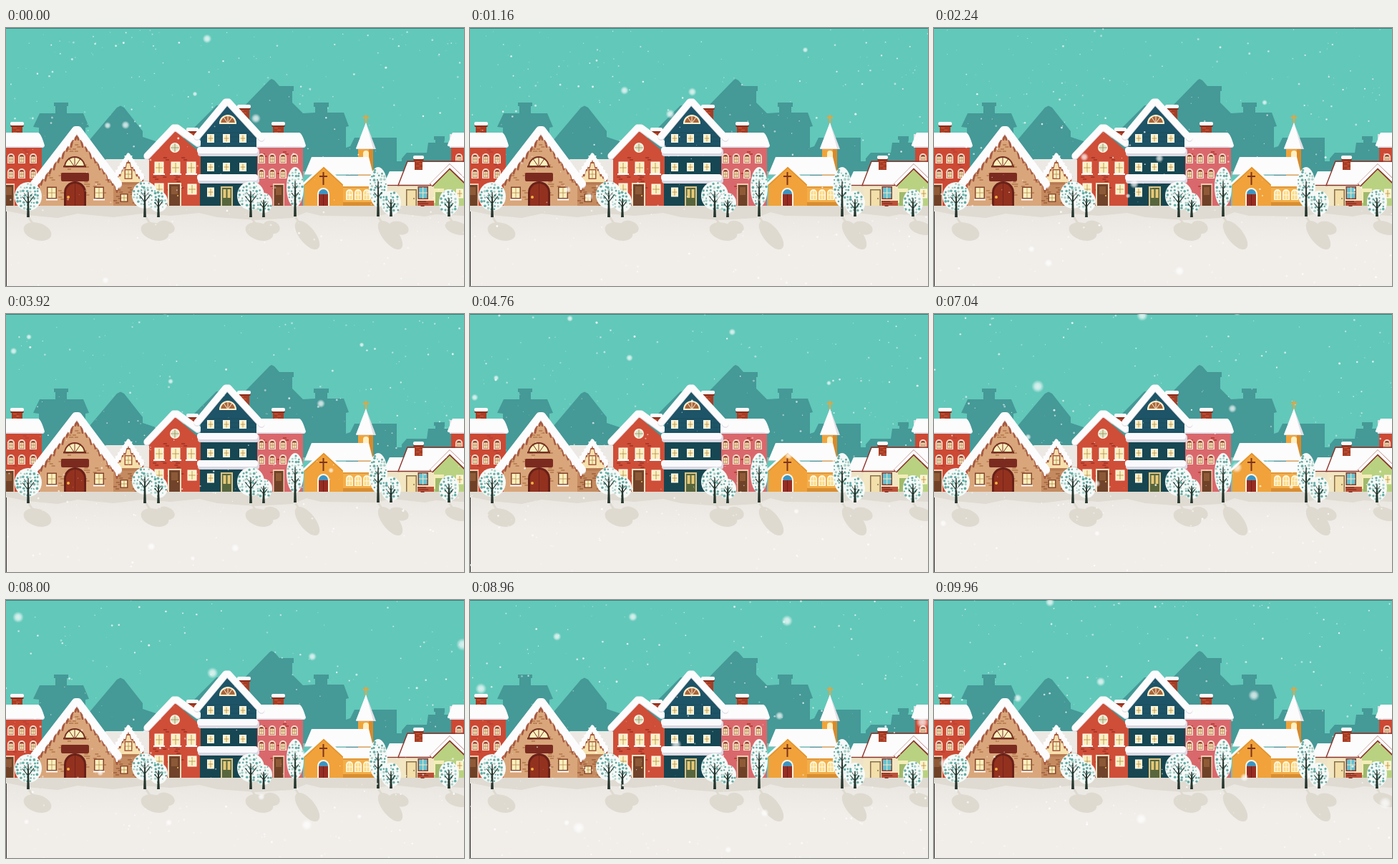
Animation of 640x360 px, one loop 10 s. Source, as an HTML page with a canvas:

```html
<!DOCTYPE html>
<html lang="en">
<head>
<meta charset="utf-8">
<title>Snowy village</title>
<style>
html, body { margin: 0; width: 100%; height: 100%; overflow: hidden; background: #62c8ba; }
canvas { display: block; width: 640px; height: 360px; }
</style>
</head>
<body>
<canvas id="stage" width="640" height="360"></canvas>
<script>
const W = 640, H = 360, LOOP = 10000, STEP = 40;
const view = document.getElementById('stage').getContext('2d');
const scene = document.createElement('canvas');
scene.width = W;
scene.height = H;
const g = scene.getContext('2d');

const SNOW = '#fdfcfd', SHADE = '#e3dfe6', CREAM = '#fdf0bd', BRICK = '#a83d25', BROWN = '#7b3b25';

function seeded(seed) {
  return () => (seed = (seed * 16807) % 2147483647) / 2147483647;
}

// drawing helpers
function rect(color, x, y, w, h) {
  g.fillStyle = color;
  g.fillRect(x, y, w, h);
}
function trace(pts) {
  g.beginPath();
  for (let i = 0; i < pts.length; i += 2) g.lineTo(pts[i], pts[i + 1]);
}
function poly(color, ...pts) {
  trace(pts);
  g.fillStyle = color;
  g.fill();
}
function line(color, width, ...pts) {
  trace(pts);
  g.strokeStyle = color;
  g.lineWidth = width;
  g.stroke();
}
function oval(color, x, y, rx, ry = rx, turn = 0) {
  g.beginPath();
  g.ellipse(x, y, rx, ry, turn, 0, 7);
  g.fillStyle = color;
  g.fill();
}
function arch(color, x, y, w, h) {
  const r = w / 2;
  g.beginPath();
  g.arc(x + r, y + r, r, Math.PI, 0);
  g.lineTo(x + w, y + h);
  g.lineTo(x, y + h);
  g.fillStyle = color;
  g.fill();
}
function slab(color, x, y, w, h, r) {
  g.beginPath();
  g.roundRect(x, y, w, h, r);
  g.fillStyle = color;
  g.fill();
}

// building parts
function pane(x, y, w, h, frame = '#fff8e8', bar = '#b08a4c') {
  rect(frame, x - w / 2 - 1.5, y - h / 2 - 1.5, w + 3, h + 3);
  rect(CREAM, x - w / 2, y - h / 2, w, h);
  line(bar, 0.8, x, y - h / 2, x, y + h / 2);
  line(bar, 0.8, x - w / 2, y, x + w / 2, y);
}
function archPane(x, y, frame = '#f8dccb') {
  arch(frame, x - 5, y - 8, 10, 14);
  arch('#8f3a2d', x - 3.2, y - 6, 6.4, 11);
  rect(CREAM, x - 2.6, y - 3.5, 5.2, 8);
  line('#a66a4b', 0.7, x, y - 4, x, y + 5);
  line('#a66a4b', 0.7, x - 3, y, x + 3, y);
}
function fanlight(x, y, r, frame, glass) {
  arch(frame, x - r, y - r, 2 * r, r);
  arch(glass, x - r + 2, y - r + 2, 2 * r - 4, r - 3);
  for (const a of [-0.6, 0, 0.6]) line(frame, 1, x, y, x + r * Math.sin(a), y - r * Math.cos(a));
}
function chimney(x, y, w, h) {
  rect(BRICK, x, y, w, h);
  rect('#8d2e1c', x - 1.5, y + 4, w + 3, 3);
  for (let j = 8; j < h; j += 3) rect('#c65b3c', x + (j % 2) * 4 + 2, y + j, 5, 1);
  slab(SNOW, x - 2, y, w + 4, 5, 2);
}
function bricks(color, seed, count, x, y, w, h) {
  const rnd = seeded(seed);
  for (let i = 0; i < count; i++) {
    const bx = x + rnd() * w, by = y + Math.floor(rnd() * h / 3) * 3;
    rect(color, bx, by, 5, 2);
    rect(color, bx + 3, by + 3, 5, 2);
  }
}
function snowRoof(width, ...pts) {
  g.lineCap = g.lineJoin = 'round';
  line(SHADE, width, ...pts.map((p, i) => i % 2 ? p + 1.5 : p));
  line(SNOW, width, ...pts);
  g.lineCap = 'butt';
  g.lineJoin = 'miter';
}
function icing(x1, y1, x2, y2, n, color) {
  for (let i = 0; i <= n; i++) {
    const x = x1 + (x2 - x1) * i / n, y = y1 + (y2 - y1) * i / n;
    poly(color, x - 3.6, y - 4, x + 3.6, y - 4, x + 1, y + 5 + i % 2 * 2, x - 1, y + 5 + i % 2 * 2);
  }
}

function backdrop() {
  rect('#62c8ba', 0, 0, W, H);
  const c = '#459997';
  poly(c, 47, 119, 69, 119, 69, 109, 67, 109, 67, 104, 87, 104, 87, 109, 85, 109, 85, 119, 108, 119,
    116, 138, 111, 139, 111, 215, 46, 215, 46, 139, 38, 138);
  poly(c, 111, 163, 155, 111, 160, 108.5, 165, 111, 191, 144, 191, 152, 215, 160, 215, 215, 100, 215);
  poly(c, 240, 162, 294, 108, 310, 107, 330, 112, 368, 73, 371, 71, 375, 73, 382, 81, 402, 81, 402, 88,
    400, 88, 400, 104, 415, 119, 432, 118, 432, 110, 430, 110, 430, 104, 451, 104, 451, 110, 449, 110,
    449, 118, 472, 118, 479, 137, 475, 138, 475, 200, 240, 200);
  poly(c, 475, 167, 481, 165, 487, 153, 546, 153, 546, 186, 553, 186, 553, 182, 560, 174, 588, 174,
    590, 160, 600, 160, 600, 156, 598, 156, 598, 151, 613, 151, 613, 156, 612, 160, 640, 160, 640, 215, 475, 215);
}

function ground() {
  const fill = g.createLinearGradient(0, 248, 0, 300);
  fill.addColorStop(0, '#e9e5df');
  fill.addColorStop(1, '#f1eeea');
  rect(fill, 0, 248, W, 112);
  poly('#dfdbd2', 0, 248, 640, 248, 640, 262, 600, 260, 585, 263, 540, 258, 515, 263, 440, 262, 420, 257,
    400, 265, 350, 268, 295, 264, 270, 258, 230, 262, 190, 259, 150, 264, 100, 259, 72, 265, 30, 261, 0, 255);
  const s = '#dedad0';
  for (const x of [31, 195, 342, 404, 520, 619]) line(s, 3, x, 263, x + 12, 282);
  oval(s, 44, 284, 20, 12, 0.3);
  oval(s, 208, 284, 20, 12, 0.3);
  oval(s, 223, 278, 13, 9, 0.3);
  oval(s, 354, 284, 20, 12, 0.3);
  oval(s, 371, 278, 12, 9, 0.3);
  oval(s, 421, 289, 24, 11, 0.9);
  oval(s, 537, 289, 24, 11, 0.9);
  oval(s, 549, 279, 14, 9, 0.3);
  oval(s, 630, 279, 17, 9, 0.3);
}

function rowHouse(x, wall, cols, door) {
  rect(wall, x + 2, 160, 64, 88);
  bricks('#b84237', x + 99, 5, x + 4, 166, 50, 76);
  for (const c of cols) {
    archPane(c, 183);
    archPane(c, 204);
  }
  rect('#f0cdb4', door - 8, 217, 16, 31);
  rect('#6f4127', door - 6.5, 219, 13, 29);
  rect('#8f5a37', door - 4, 222, 8, 11);
  chimney(x + 24, 131, 15, 17);
  poly(SHADE, x, 148, x + 62, 148, x + 70, 165, x + 68, 167, x, 167);
  g.beginPath();
  g.moveTo(x + 4, 146);
  g.lineTo(x + 61, 146);
  g.quadraticCurveTo(x + 65, 147, x + 70, 164);
  g.quadraticCurveTo(x + 68, 167, x + 62, 165);
  g.lineTo(x + 2, 165);
  g.quadraticCurveTo(x - 4, 166, x - 3, 163);
  g.fillStyle = SNOW;
  g.fill();
}

function gingerbread() {
  slab('#ece9e4', 136, 183, 66, 40, 5);
  rect('#d9d6cf', 146, 213, 55, 35);
  // annex
  rect('#c58b60', 148, 215, 38, 33);
  bricks('#a86a45', 37, 7, 150, 222, 28, 22);
  poly('#f6e1ad', 171, 182, 189, 215, 152, 215);
  icing(170, 184, 152, 211, 5, '#a8593f');
  icing(172, 184, 190, 211, 5, '#a8593f');
  snowRoof(5, 151, 208, 171, 177, 191, 208);
  icing(169, 182, 153, 207, 5, SNOW);
  icing(173, 182, 189, 207, 5, SNOW);
  line('#b67a52', 3, 149, 217, 190, 217);
  pane(171, 204, 8, 11, '#a8593f');
  pane(165, 237, 8, 9, '#8b4a30');
  // main gable
  poly('#d9a67b', 99, 146, 150, 218, 150, 248, 47, 248, 47, 218);
  bricks('#bd8257', 71, 20, 54, 184, 85, 60);
  bricks('#bd8257', 12, 4, 85, 162, 20, 14);
  icing(97, 152, 43, 223, 9, '#a75940');
  icing(101, 152, 155, 223, 9, '#a75940');
  snowRoof(10, 39, 217, 97, 142, 101, 142, 157, 217);
  icing(94, 151, 41, 219, 9, SNOW);
  icing(104, 151, 155, 219, 9, SNOW);
  fanlight(96, 194, 15, '#743022', CREAM);
  rect('#743022', 80, 192, 32, 2.5);
  slab('#7b2a20', 77, 202, 39, 12, 2);
  arch('#682018', 81, 214, 31, 34);
  arch('#93311f', 84, 217, 25, 31);
  line('#752319', 1, 96.5, 217, 96.5, 248);
  oval('#f3b343', 87, 236, 2);
  for (const x of [64, 130]) {
    pane(x, 230, 11, 14, '#83452d');
    rect(SNOW, x - 8, 238.5, 16, 2);
  }
}

function redHouse() {
  poly('#cf4e38', 236, 143, 272, 175, 272, 248, 200, 248, 200, 178);
  bricks('#a93827', 51, 12, 203, 180, 58, 62);
  chimney(254, 139, 13, 16);
  snowRoof(9, 197, 178, 234, 139, 239, 139, 268, 160);
  oval('#fff4e2', 236, 167, 7);
  oval('#d9e5c8', 236, 167, 5);
  line('#a98752', 0.8, 230, 167, 242, 167);
  line('#a98752', 0.8, 236, 161, 236, 173);
  for (const x of [214, 237, 259]) {
    pane(x, 195, 10, 14);
    rect(SNOW, x - 8, 203, 16, 2);
  }
  pane(214, 225, 10, 14);
  pane(260, 225, 10, 12);
  rect('#f5dfc2', 226, 216, 19, 32);
  rect('#70432a', 228, 218, 15, 30);
  rect('#8c5938', 231, 221, 9, 11);
  oval('#f3c04d', 240, 234, 1);
}

function blueHouse() {
  chimney(325, 107, 15, 26);
  poly('#1e5467', 309, 106, 350, 147, 350, 170, 272, 170, 272, 144);
  rect('#164752', 272, 172, 79, 36);
  rect('#174650', 271, 210, 81, 38);
  for (let y = 146; y < 245; y += 6) line('#184955', 0.6, 273, y, 350, y);
  snowRoof(9, 267, 151, 307, 103, 311, 103, 357, 153);
  for (const y of [166, 204]) {
    slab('#d9d8e2', 268, y + 2, 86, 11, 4);
    slab('#faf9fc', 267, y, 85, 9, 4);
  }
  fanlight(310, 133, 12, '#fff1cf', '#a9653c');
  rect('#fff1cf', 298, 132, 24, 2);
  for (const x of [286, 308, 331]) {
    pane(x, 154, 7, 9);
    pane(x, 194, 7, 9);
  }
  pane(286, 229, 7, 10);
  pane(333, 229, 7, 10);
  rect('#d9c38a', 300, 221, 17, 27);
  rect('#58663d', 302, 223, 13, 25);
  rect('#e7c978', 303.5, 225, 4, 12);
  rect('#e7c978', 309.5, 225, 4, 12);
}

function church() {
  rect('#f0a43a', 492, 166, 21, 45);
  rect('#d98a2a', 507, 168, 6, 36);
  arch('#fff0c4', 499, 171, 8, 10);
  line('#f2a132', 2, 503, 121, 503, 135);
  line('#f2a132', 2, 499, 125, 507, 125);
  poly(SHADE, 503, 132, 517, 169, 489, 169);
  poly(SNOW, 503, 132, 513, 168, 489, 168);
  poly(SNOW, 427, 180, 507, 180, 513, 204, 417, 204);
  line('#c8c9d2', 1, 417, 204.5, 513, 204.5);
  rect('#f3ae49', 466, 218, 48, 30);
  poly(SNOW, 450, 206, 512, 206, 516, 221, 466, 221);
  line('#cd812b', 1.2, 466, 222, 515, 222);
  for (const x of [480, 492, 504]) {
    arch('#fff8e6', x - 5, 225, 10, 15);
    arch('#fbdc86', x - 3.5, 227, 7, 12);
    line('#fff8e6', 1, x, 226, x, 240);
    line('#fff8e6', 1, x - 4, 233, x + 4, 233);
  }
  rect('#d98d30', 470, 243, 44, 5);
  poly('#f1a23a', 444, 193, 471, 218, 471, 248, 417, 248, 417, 218);
  line(SNOW, 3, 415, 218, 444, 191.5, 473, 218);
  line('#d88a2c', 1, 418, 219, 444, 195, 470, 219);
  line('#7d351c', 2, 443.5, 201, 443.5, 219);
  line('#7d351c', 2, 438, 207, 449, 207);
  arch('#fff6e6', 435, 223, 17, 25);
  arch('#3e93c0', 437, 225, 13, 8);
  rect('#982c22', 437, 232, 13, 16);
  line('#6e1e18', 1, 443.5, 232, 443.5, 248);
}

function cottage() {
  rect('#eee3c6', 529, 216, 26, 32);
  poly(SNOW, 536, 200, 556, 200, 556, 219, 527, 219);
  line('#86352a', 1.3, 527, 219.5, 556, 219.5);
  rect('#f2e7c2', 550, 216, 50, 32);
  poly(SNOW, 561, 187, 640, 187, 640, 219, 549, 219);
  line('#8d3329', 1.4, 640, 186, 561, 186, 548, 219.5, 603, 219.5);
  chimney(571, 178, 11, 20);
  rect('#8a6e4b', 559, 225, 15, 23);
  rect('#f2dfa9', 560.5, 226.5, 12, 21.5);
  oval('#8a6e4b', 570, 238, 0.9);
  rect('#8d3a2c', 575.5, 221, 14.5, 18);
  rect('#65c3d1', 577, 222.5, 11.5, 15);
  line('#f3e8c7', 1, 582.7, 222, 582.7, 238);
  line('#f3e8c7', 1, 577, 230, 589, 230);
  rect('#bd5038', 575, 241, 25, 7);
  bricks('#963a29', 23, 4, 575, 241, 19, 5);
  poly('#b9d281', 620, 196, 645, 221, 645, 248, 598, 248, 598, 219);
  line('#8d3329', 6, 594, 219.5, 620, 193.5, 647, 219.5);
  line(SNOW, 4, 594, 218.5, 620, 192.5, 647, 218.5);
  rect('#f4edb8', 598, 224, 14, 20);
  rect('#9fb96c', 600, 229, 11, 19);
  pane(634, 231, 7, 10);
}

function tree(x, y, rx, ry, base) {
  oval('#f6f9f7', x, y, rx, ry);
  const rnd = seeded(x * 31 + 7);
  const cell = 4.9;
  for (let j = -ry; j < ry; j += cell) {
    for (let i = -rx; i < rx; i += cell) {
      const dx = i + 2 + rnd() * 2.4, dy = j + 2 + rnd() * 2.4;
      const tone = rnd() < 0.7 ? '#62aba3' : '#a9d0c8';
      if ((dx / rx) ** 2 + (dy / ry) ** 2 < 0.85) oval(tone, x + dx, y + dy, 1 + rnd() * 0.9);
    }
  }
  const c = '#24352d';
  poly(c, x - 0.6, y - ry * 0.3, x + 0.6, y - ry * 0.3, x + 1.9, base, x - 1.9, base);
  const fork = y + ry * 0.5;
  line(c, 1.1, x - rx * 0.42, fork - rx * 0.5, x, fork, x + rx * 0.42, fork - rx * 0.55);
  line(c, 0.8, x - rx * 0.3, y - rx * 0.25, x, y + 3, x + rx * 0.3, y - rx * 0.2);
}

function paintScene() {
  backdrop();
  ground();
  rowHouse(-16, '#cc4934', [-8, 7, 22, 38], 4);
  rowHouse(620, '#cc4934', [633, 648], 670);
  rowHouse(349, '#d9686c', [357, 372, 387, 403], 381);
  gingerbread();
  redHouse();
  blueHouse();
  church();
  cottage();
  tree(31, 235, 19, 20, 264);
  tree(194, 233, 18, 19, 264);
  tree(213, 242, 13, 15, 264);
  tree(342, 234, 19, 20, 264);
  tree(360, 244, 12, 14, 264);
  tree(404, 222, 12, 28, 263);
  tree(520, 222, 13, 28, 263);
  tree(538, 244, 14, 17, 263);
  tree(619, 243, 14, 18, 263);
  rect('rgba(20,50,50,.5)', 0, 0, W, 1);
  rect('#3c3c3a', 0, 256, 1, 104);
}

// fine snow
const rnd = seeded(2024);
const fine = Array.from({ length: 330 }, () => {
  const depth = rnd() ** 2;
  return {
    x: rnd() * 660, y: rnd() * 380, r: 0.45 + depth * 1.1, a: 0.35 + rnd() * 0.5,
    fall: 22 + depth * 34, drift: rnd() * 10 - 5, phase: rnd() * 6.3
  };
});

// near flakes: second, x, y, radius
const near = [
  [0, 281, 15, 6.5], [0, 142, 136, 5], [0, 264, 92, 3.5], [0, 139, 352, 5],
  [2.24, 343, 339, 7], [2.24, 160, 328, 6], [2.24, 315, 182, 6], [2.24, 210, 180, 6], [2.24, 462, 104, 4],
  [3.92, 440, 125, 6], [3.92, 230, 94, 4], [3.92, 32, 32, 4], [3.92, 497, 43, 3.5],
  [5.68, 362, 96, 5], [5.68, 225, 132, 5], [5.68, 136, 73, 4.5],
  [7.04, 145, 101, 9], [7.04, 291, 2, 8], [7.04, 423, 214, 8], [7.04, 417, 132, 6], [7.04, 13, 292, 5],
  [8, 17, 24, 8], [8, 638, 62, 9], [8, 428, 79, 6],
  [9.96, 162, 3, 6.5], [9.96, 117, 137, 6], [9.96, 233, 114, 6.5], [9.96, 447, 133, 8]
];

const glow = document.createElement('canvas');
glow.width = glow.height = 32;
{
  const c = glow.getContext('2d'), soft = c.createRadialGradient(16, 16, 0, 16, 16, 16);
  soft.addColorStop(0, 'rgba(255,255,255,.9)');
  soft.addColorStop(0.45, 'rgba(255,255,255,.75)');
  soft.addColorStop(1, 'rgba(255,255,255,0)');
  c.fillStyle = soft;
  c.fillRect(0, 0, 32, 32);
}

const wrap = (v, n) => ((v % n) + n) % n;

function draw(now) {
  const t = Math.floor((now % LOOP) / STEP) * STEP / 1000;
  view.drawImage(scene, 0, 0);
  view.fillStyle = '#fff';
  for (const f of fine) {
    const x = wrap(f.x + f.drift * t + 3 * Math.sin(t + f.phase), 660) - 10;
    const y = wrap(f.y + f.fall * t, 380) - 10;
    view.globalAlpha = f.a;
    view.beginPath();
    view.arc(x, y, f.r, 0, 7);
    view.fill();
  }
  view.globalAlpha = 0.85;
  for (const [t0, x0, y0, r] of near) {
    const dt = t - t0;
    const x = x0 + 8 * Math.sin(dt * 0.9) * Math.cos(x0), y = y0 + (32 + r * 9) * dt;
    if (y > -r && y < H + r) view.drawImage(glow, x - r, y - r, 2 * r, 2 * r);
  }
  view.globalAlpha = 1;
  requestAnimationFrame(() => draw(performance.now() - start));
}

paintScene();
const start = performance.now();
draw(0);
</script>
</body>
</html>
```
